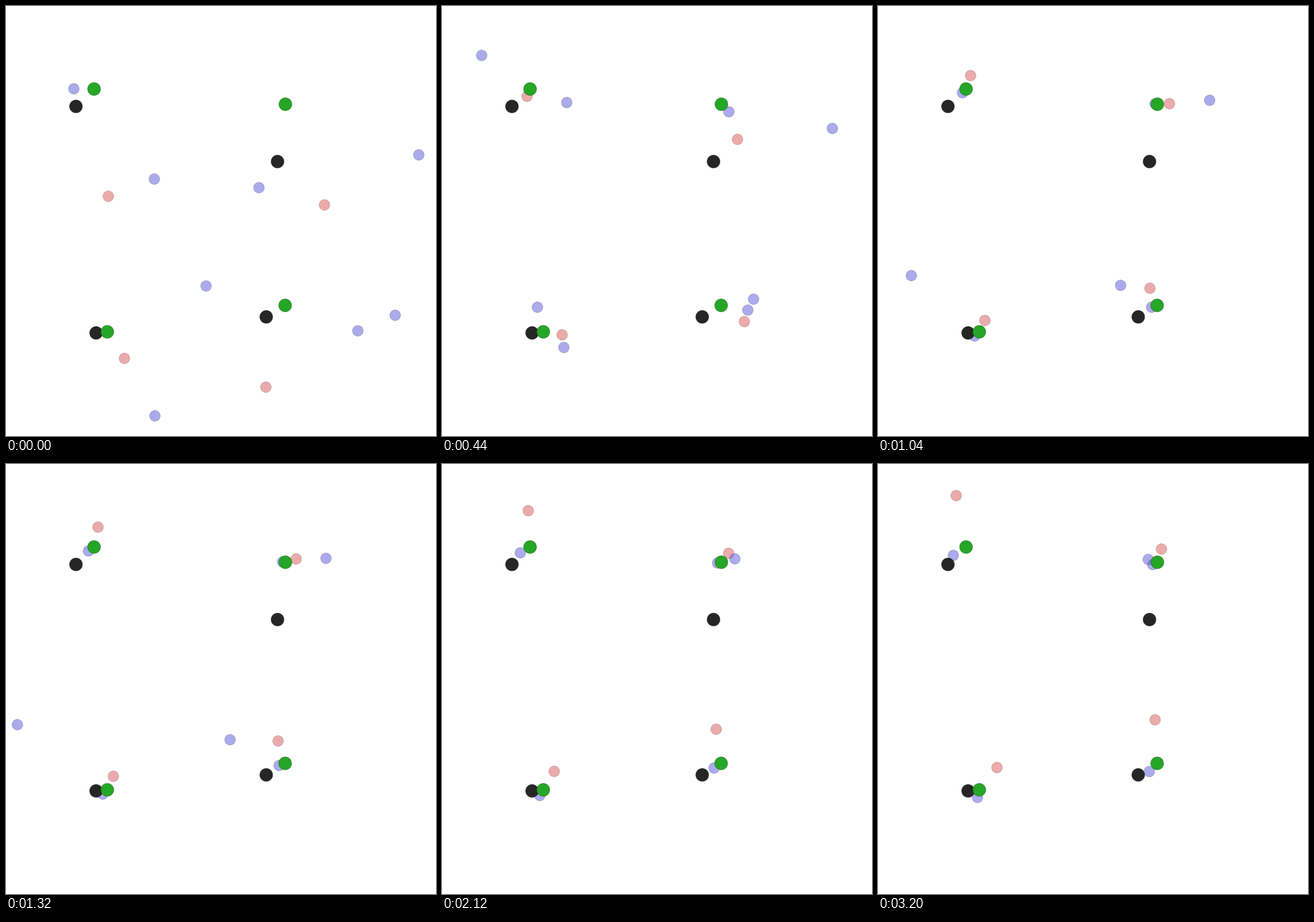
A matplotlib script that plays this animation: 748 px wide and 748 px high, repeating every 3240 ms.

```python
import matplotlib.pyplot as plt
import numpy as np
from matplotlib.animation import FuncAnimation
from matplotlib.patches import Circle, Rectangle

SIZE, DPI = 748, 100
HALF = SIZE / 2
UNIT = HALF / 2
FRAMES, INTERVAL = 81, 40
# Shared phases of every run: start, approach, arrive, drift out
PHASES = np.array([0, 11, 26, 80])

BLACK, GREEN = (0.15, 0.15, 0.15), (0.15, 0.65, 0.15)
BLUE, RED = (0.35, 0.35, 0.85), (0.85, 0.35, 0.35)

fig = plt.figure(figsize=(SIZE / DPI, SIZE / DPI), dpi=DPI, facecolor="white")
ax = fig.add_axes([0, 0, 1, 1])
ax.set_xlim(0, SIZE)
ax.set_ylim(SIZE, 0)
ax.axis("off")


def velocity(points):
    """Speed at each phase: from rest, no overshoot, half speed at the end."""
    d = np.diff(points, axis=0) / np.diff(PHASES)[:, None]
    a, b = d[:-1], d[1:]
    inner = 2 * np.maximum(a * b, 0) / np.where(a + b == 0, 1, a + b)
    return np.vstack([np.zeros(2), np.where(a * b > 0, inner, 0), d[-1] / 2])


def position(points, speeds, frame):
    """Cubic Hermite between the two phases around the frame."""
    i = min(np.searchsorted(PHASES, frame, side="right") - 1, len(PHASES) - 2)
    h = PHASES[i + 1] - PHASES[i]
    s = (frame - PHASES[i]) / h
    ease = s * s * (3 - 2 * s)
    swing = s * (1 - s) * h
    return (points[i] + (points[i + 1] - points[i]) * ease
            + swing * ((1 - s) * speeds[i] - s * speeds[i + 1]))


def disc(center, radius, color, alpha, clip, z):
    rim = [c / 2 for c in color]
    dot = ax.add_patch(Circle(center, radius * UNIT, facecolor=(*color, alpha),
                              edgecolor=(*rim, alpha / 2),
                              linewidth=72 / DPI, zorder=z))
    dot.set_clip_path(clip)
    return dot


agents = []


def world(col, row, black, green, chaser, runner, drifter):
    """One quarter of the stage; agents leaving it are cut off."""
    clip = Rectangle((col * HALF, row * HALF), HALF, HALF, transform=ax.transData)
    routes = (RED, chaser), (BLUE, runner), (BLUE, drifter)
    for z, (color, route) in enumerate(routes):
        points = np.array(route, float)
        dot = disc(points[0], 0.05, color, 0.5, clip, z)
        agents.append((dot, points, velocity(points)))
    disc(black, 0.06, BLACK, 1, clip, 5)
    disc(green, 0.06, GREEN, 1, clip, 6)


world(0, 0, (121.7, 174.7), (153.2, 144.4),
      chaser=[(178, 331), (148, 157), (161, 121), (136, 55)],
      runner=[(258, 301), (217, 168), (147, 151), (131, 159)],
      drifter=[(118, 144), (69, 86), (-20, -60), (-100, -150)])

world(1, 0, (472.3, 270.6), (486, 170.9),
      chaser=[(554, 346), (514, 232), (507, 170), (493, 148)],
      runner=[(440, 316), (499, 184), (482, 170), (478, 175)],
      drifter=[(718, 259), (679, 213), (577, 164), (470, 166)])

world(0, 1, (156.7, 568.7), (176.2, 566.8),
      chaser=[(206, 613), (209, 572), (186, 547), (207, 528)],
      runner=[(259, 713), (212, 594), (168, 574), (173, 580)],
      drifter=[(348, 487), (166, 524), (58, 469), (-180, 380)])

world(1, 1, (452.7, 540.8), (485.6, 520.8),
      chaser=[(452, 663), (526, 549), (473, 491), (482, 445)],
      runner=[(612, 565), (532, 529), (476, 524), (472, 535)],
      drifter=[(677, 538), (542, 510), (422, 486), (240, 450)])


def draw(frame):
    for dot, points, speeds in agents:
        dot.center = position(points, speeds, frame)
    return [agent[0] for agent in agents]


anim = FuncAnimation(fig, draw, frames=FRAMES, interval=INTERVAL,
                     repeat=True, repeat_delay=0)
plt.show()
```
